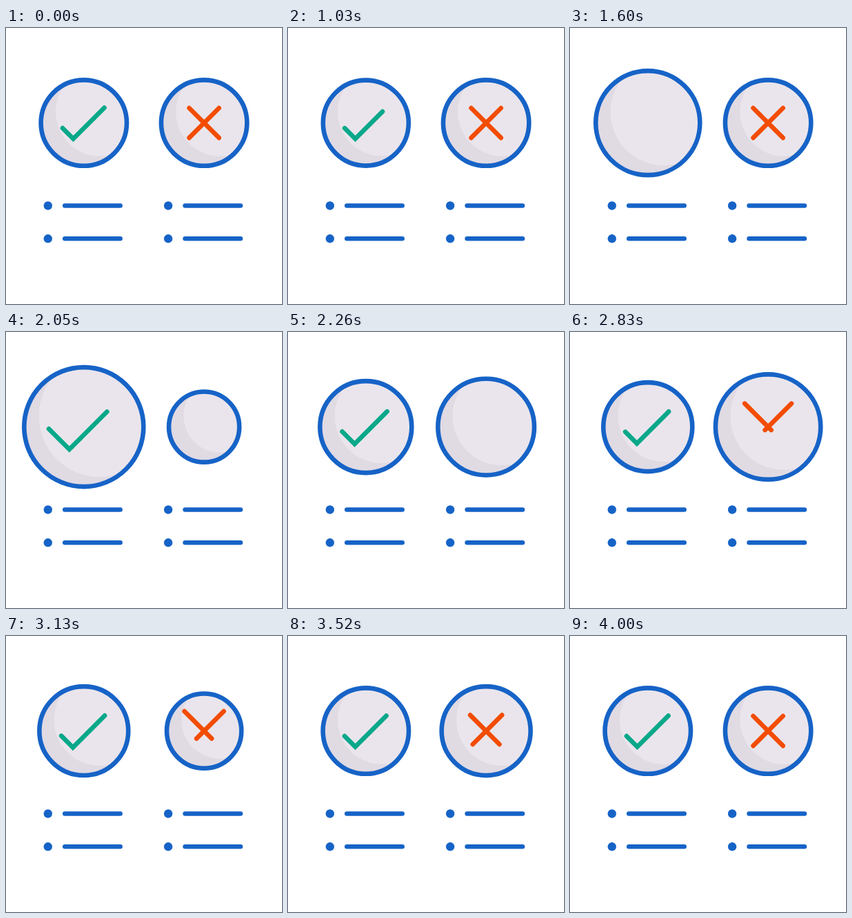
An HTML page with a canvas for the animation above (4.03 s loop, 400 by 400 pixels).

```html
<!DOCTYPE html>
<html>
<head>
<meta charset="utf-8">
<style>
html, body { margin: 0; width: 100%; height: 100%; overflow: hidden; background: #fff; }
canvas { display: block; }
</style>
</head>
<body>
<canvas id="stage" width="400" height="400"></canvas>
<script>
const ctx = document.getElementById('stage').getContext('2d');
const LOOP = 4030, HOLD = 1030, STEP = 30;
const LEFT = 112.8, GAP = 174.3, MID = 137.6, DELAY = 690;
const REST = 65.5, ARM = 21.6;
const BLUE = '#1663c7', GREEN = '#08a88a', ORANGE = '#f24c00';
const LIGHT = '#eae5ec', SHADE = '#e0dae3';

// Value at time t through [time, value] keys, eased with a half cosine.
function keyed(t, keys) {
  if (t <= keys[0][0]) return keys[0][1];
  for (let i = 1; i < keys.length; i++) {
    const [t0, v0] = keys[i - 1], [t1, v1] = keys[i];
    if (t < t1) return v0 + (v1 - v0) * (1 - Math.cos(Math.PI * (t - t0) / (t1 - t0))) / 2;
  }
  return keys[keys.length - 1][1];
}

const ramp = (t, from, to) => Math.min(1, Math.max(0, (t - from) / (to - from)));

// Outer radius of a disc: squeeze, swell, rebound, settle.
const radius = (t, peak) => keyed(t, [
  [1010, REST], [1270, 52], [1830, peak], [1930, peak],
  [2480, 57], [2960, 70], [3300, REST]
]);

function disc(x, y, r, color) {
  ctx.fillStyle = color;
  ctx.beginPath();
  ctx.arc(x, y, r, 0, 2 * Math.PI);
  ctx.fill();
}

function line(color, ...points) {
  ctx.strokeStyle = color;
  ctx.beginPath();
  points.forEach(([x, y]) => ctx.lineTo(x, y));
  ctx.stroke();
}

function badge(r) {
  disc(0, 0, r - 3, SHADE);
  ctx.save();
  ctx.beginPath();
  ctx.arc(0, 0, r - 3, 0, 2 * Math.PI);
  ctx.clip();
  disc(23.2, -15.8, r - 1.5, LIGHT);
  ctx.restore();
  ctx.strokeStyle = BLUE;
  ctx.beginPath();
  ctx.arc(0, 0, r - 3.3, 0, 2 * Math.PI);
  ctx.stroke();
}

function check(t, r) {
  const shown = t < 1500 ? 1 - ramp(t, 1008, 1250) : ramp(t, 1690, 2061);
  if (!shown) return;
  const grow = r - REST;
  const x = -15.3 - 0.235 * grow, y = 23 + 0.39 * grow;
  const short = 15.5 + 0.585 * grow, long = 45 + 0.5 * grow;
  const drawn = shown * (short + long);
  const first = Math.min(drawn, short), second = drawn - first;
  const path = [[x - short, y - short], [x - short + first, y - short + first]];
  if (second > 0) path.push([x + second, y - second]);
  line(GREEN, ...path);
}

function cross(t) {
  let from = -ARM, to = ARM;
  if (t < 2200) {
    const left = 1 - ramp(t, 1700, 1940);
    if (!left) return;
    to = from + 2 * ARM * left;
  } else {
    if (t < 2350) return;
    from = keyed(t, [[2560, -38.5], [3130, -28.5], [3690, -ARM]]);
    to = t < 2560
      ? from + 37.5 * ramp(t, 2340, 2560)
      : keyed(t, [[2560, -1], [3130, 11], [3690, ARM]]);
  }
  line(ORANGE, [from, from], [to, to]);
  line(ORANGE, [-from, from], [-to, to]);
}

function list(x) {
  for (const y of [257.5, 305.3]) {
    disc(x - 52, y, 6.2, BLUE);
    line(BLUE, [x - 27.5, y], [x + 52.8, y]);
  }
}

function draw(now) {
  let t = now % LOOP;
  t = t < HOLD ? 0 : HOLD + Math.floor((t - HOLD) / STEP) * STEP;
  ctx.fillStyle = '#fff';
  ctx.fillRect(0, 0, 400, 400);
  ctx.lineWidth = 6.6;
  ctx.lineCap = 'round';
  ctx.lineJoin = 'miter';
  list(LEFT);
  list(LEFT + GAP);

  ctx.save();
  ctx.translate(LEFT, MID);
  const r = radius(t, 94);
  badge(r);
  check(t, r);
  ctx.translate(GAP, 0);
  badge(radius(t - DELAY, 90));
  cross(t);
  ctx.restore();
  requestAnimationFrame(draw);
}
requestAnimationFrame(draw);
</script>
</body>
</html>
```
